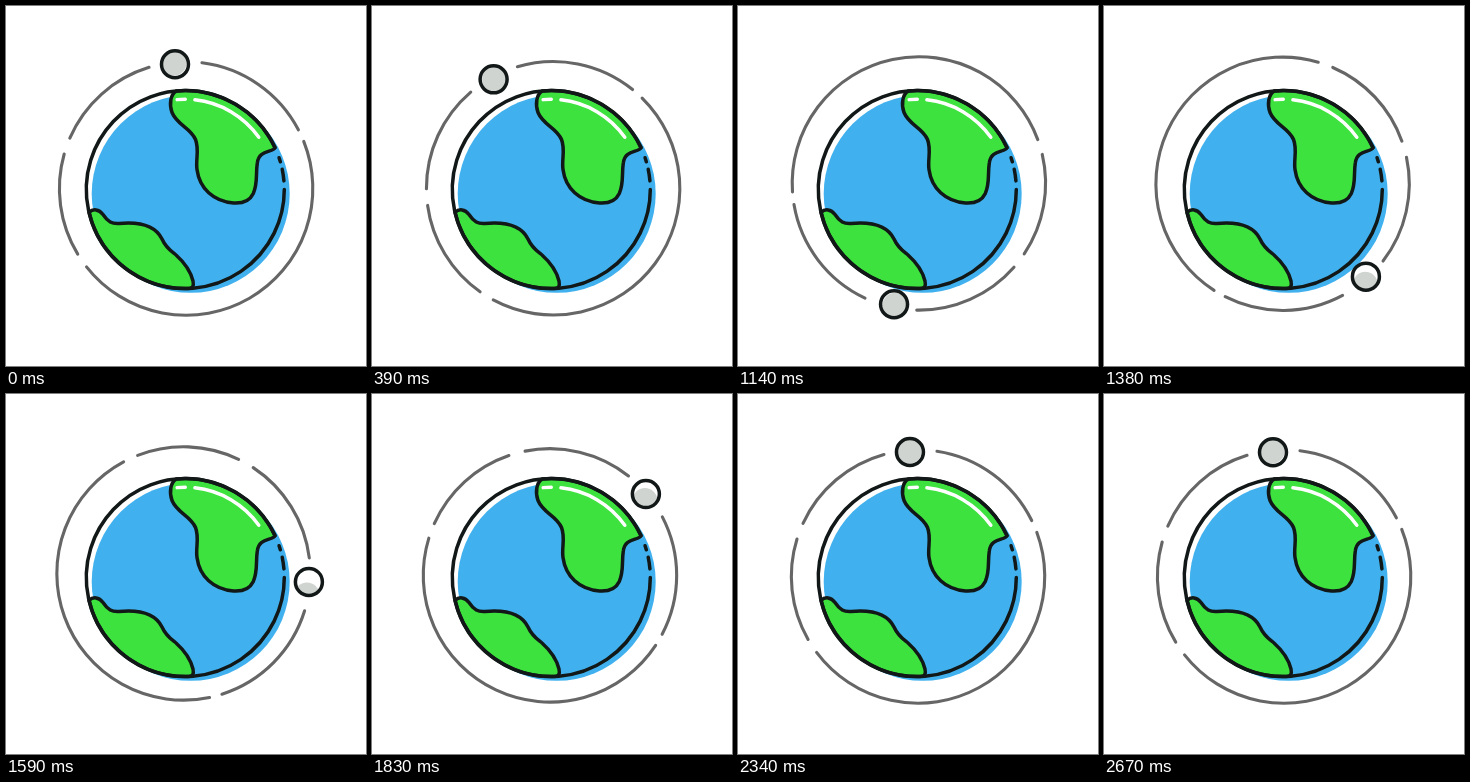
An HTML page that plays this animation: 360 px wide and 360 px high, repeating every 2700 ms.

```html
<!DOCTYPE html>
<html lang="en">
<head>
<meta charset="utf-8">
<title>Moon orbiting the Earth</title>
<style>
  html, body { margin: 0; width: 100%; height: 100%; overflow: hidden; background: #fff; }
  svg { display: block; width: 100%; height: 100%; }
  path, circle { stroke-linecap: round; stroke-linejoin: round; }
  .line { fill: none; stroke: #111817; stroke-width: 3.5; }
  .land { fill: #3ee23e; stroke: #111817; stroke-width: 3.5; }
  .shine { fill: none; stroke: #fff; stroke-width: 3.4; }
  .orbit { fill: none; stroke: #666; stroke-width: 3.1; }
</style>
</head>
<body>
<svg viewBox="0 0 360 360">
  <clipPath id="disc"><circle r="12.5"/></clipPath>
  <circle cx="184.7" cy="187.8" r="99" fill="#40b1ee"/>
  <path class="land" d="M170.300 85A99 99 0 0 1 269 141.500C267 147 253 143 251.300 157C249.500 169 252 177 247.300 187.500
    C243 196.500 235 197.500 227.500 197C207.500 195.500 193.500 182.500 191 163.500C189.500 153.500 193.500 143.500 189.500 133.500
    C184.500 121.500 171.500 119.500 166 106.500C163 98 164.500 88.500 170.300 85Z"/>
  <path class="land" d="M83 206.500C87 202.500 93 203 97 208.500C102 216 106 218 113 217.500
    C134 215.500 149 219 156 233C160 242 165 245 170 249C179 257 185 267 187 275
    C188 280 187 282.500 182 282.500A99 99 0 0 1 83 206.500Z"/>
  <g id="earth"></g>
  <g id="orbit"></g>
  <g id="moon">
    <circle r="13.5" fill="#fff"/>
    <g clip-path="url(#disc)"><circle id="shade" r="12.5" fill="#d0d4d0"/></g>
    <circle class="line" r="13.5"/>
  </g>
</svg>
<script>
const LOOP = 2700, DELAY = 14, TURN = 2415, RAD = Math.PI / 180;
const el = id => document.getElementById(id);
const smooth = x => { x = Math.min(1, Math.max(0, x)); return x * x * (3 - 2 * x); };

function arc(parent, cls, cx, cy, r, from, to) {
  const point = a => `${cx + r * Math.cos(a * RAD)} ${cy + r * Math.sin(a * RAD)}`;
  const path = document.createElementNS('http://www.w3.org/2000/svg', 'path');
  path.setAttribute('class', cls);
  path.setAttribute('d', `M${point(from)}A${r} ${r} 0 ${+(to - from > 180)} 1 ${point(to)}`);
  el(parent).append(path);
}

// Outline with a dashed stretch on the right, then the highlight
for (const [from, to] of [[0, 335], [341.3, 343.7], [348.2, 355]])
  arc('earth', 'line', 179.3, 183.5, 99, from, to);
for (const [from, to] of [[-95.2, -90], [-83.9, -35.4]])
  arc('earth', 'shine', 179.3, 183.5, 90.2, from, to);
for (const [from, to] of [[-82.8, -27.6], [-21.8, 141.8], [148.8, 195.8], [203.4, 253]])
  arc('orbit', 'orbit', 180.1, 182.5, 126.7, from, to);

// Time and offset of the moon's grey disc
const phases = [[0, -1, -1], [390, 1, 0], [690, 20, 8], [1140, 1, 1], [1590, -2, 13], [2070, 0, 0], [2430, -1, -1], [LOOP, -1, -1]];

function draw(now) {
  const t = now % LOOP;
  const turn = 360 * smooth((t - DELAY) / TURN);
  el('orbit').setAttribute('transform', `rotate(${-turn} 180.1 179.9)`);

  const a = (turn + 5.9) * RAD;
  el('moon').setAttribute('transform',
    `translate(${181.5 - 121.7 * Math.sin(a)} ${179.3 - 121.7 * Math.cos(a)})`);

  const i = phases.findIndex(p => p[0] > t);
  const [t0, x0, y0] = phases[i - 1], [t1, x1, y1] = phases[i];
  const k = smooth((t - t0) / (t1 - t0));
  el('shade').setAttribute('cx', x0 + (x1 - x0) * k);
  el('shade').setAttribute('cy', y0 + (y1 - y0) * k);
}

const start = performance.now();
function tick() {
  draw(performance.now() - start);
  requestAnimationFrame(tick);
}
tick();
</script>
</body>
</html>
```
